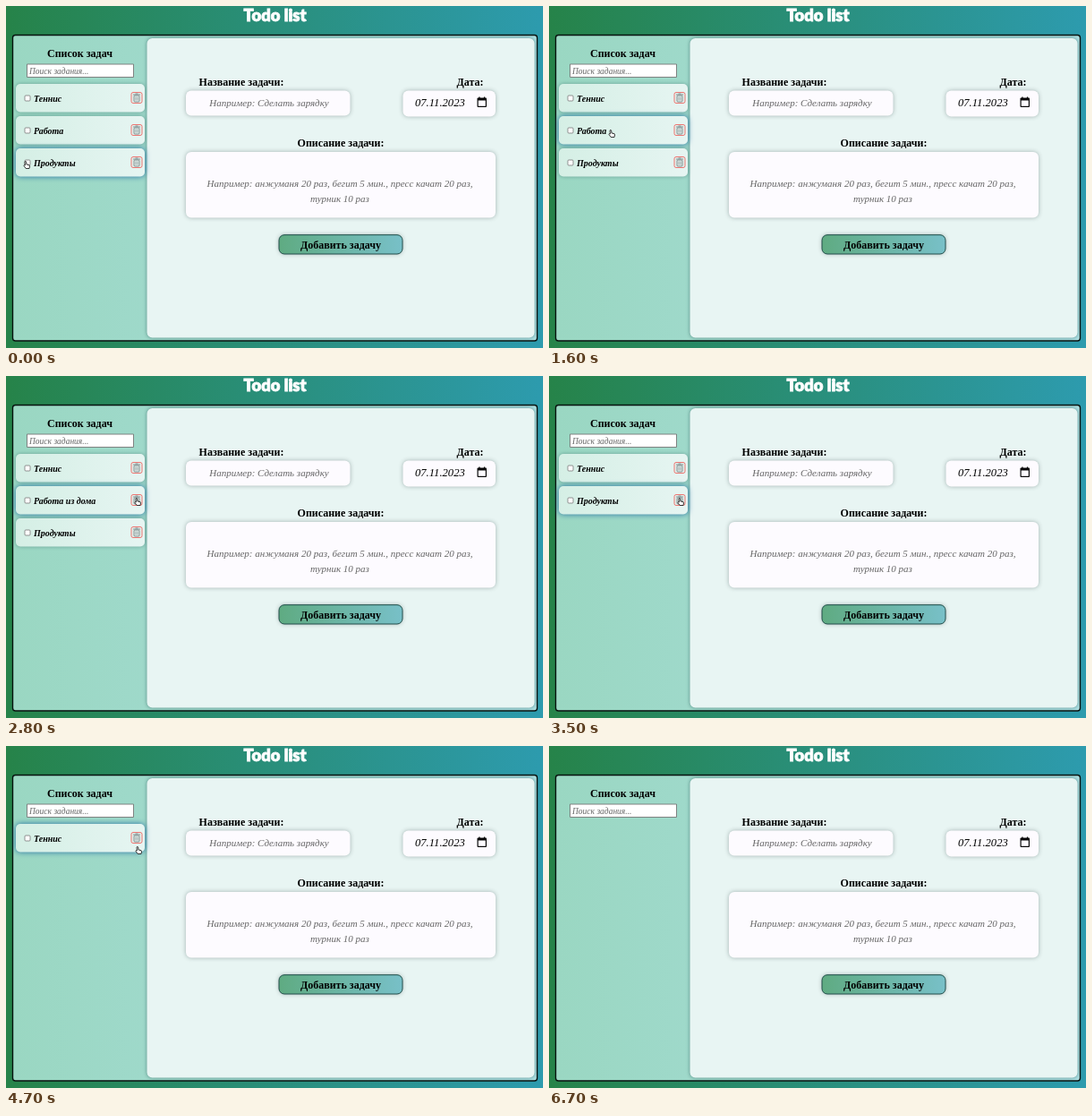
These frames come from a looping animation (600x382 px, 6800 ms). An HTML page with a canvas:

```html
<!DOCTYPE html>
<html lang="ru">
<head>
<meta charset="utf-8">
<title>Todo list</title>
<style>
html, body { margin: 0; width: 100%; height: 100%; overflow: hidden; background: #268349; }
canvas { display: block; width: 600px; height: 382px; }
</style>
</head>
<body>
<canvas id="stage" width="600" height="382"></canvas>
<script>
const ctx = document.getElementById('stage').getContext('2d');
const LOOP = 6800;
const SERIF = '"Liberation Serif", serif';
const HEAD = 'bold 12px ' + SERIF;
const HAND = 'italic 11px ' + SERIF;
const NAME = 'italic bold 10px ' + SERIF;

// Pointer tip: time, x, y
const PATH = [
  [0, 21, 173], [1250, 21, 173], [1500, 68, 138], [2050, 68, 138],
  [2300, 153, 133], [2700, 145, 136], [4300, 145, 136], [4700, 146, 112],
  [4900, 146, 103], [5300, 146, 103], [5550, 148, 104],
  [5650, 148, 104], [5900, -12, 104], [6800, -12, 104]
];

const TASKS = [
  { name: () => 'Теннис', until: 5150 },
  { name: t => 'Работа' + ' из дома'.slice(0, Math.max(0, Math.floor((t - 1550) / 70))), until: 2950 },
  { name: () => 'Продукты', until: 4100, done: t => t >= 600 && t < 1200 }
];

function pointerAt(t) {
  const i = Math.max(1, PATH.findIndex(p => p[0] > t));
  const [t0, x0, y0] = PATH[i - 1], [t1, x1, y1] = PATH[i];
  const u = (t - t0) / (t1 - t0), e = u * u * (3 - 2 * u);
  return [x0 + (x1 - x0) * e, y0 + (y1 - y0) * e];
}

function gradient(x0, x1, from, to) {
  const g = ctx.createLinearGradient(x0, 0, x1, 0);
  g.addColorStop(0, from);
  g.addColorStop(1, to);
  return g;
}

function box(x, y, w, h, r, fill, stroke, line = 1) {
  ctx.beginPath();
  ctx.roundRect(x, y, w, h, r);
  if (fill) { ctx.fillStyle = fill; ctx.fill(); }
  if (stroke) { ctx.strokeStyle = stroke; ctx.lineWidth = line; ctx.stroke(); }
}

function raised(x, y, w, h, r, fill, shadow = 'rgba(40,60,60,.38)', blur = 5) {
  ctx.save();
  ctx.shadowColor = shadow;
  ctx.shadowBlur = blur;
  box(x, y, w, h, r, fill);
  ctx.restore();
}

function text(s, x, y, font, color = '#000', align = 'center') {
  ctx.font = font;
  ctx.fillStyle = color;
  ctx.textAlign = align;
  ctx.fillText(s, x, y);
}

function lines(color, width, ...segments) {
  ctx.strokeStyle = color;
  ctx.lineWidth = width;
  ctx.beginPath();
  for (const [x0, y0, x1, y1] of segments) {
    ctx.moveTo(x0, y0);
    ctx.lineTo(x1, y1);
  }
  ctx.stroke();
}

function shape(path, x, y, fill, stroke) {
  const p = new Path2D(path);
  ctx.save();
  ctx.translate(x, y);
  ctx.lineJoin = 'round';
  ctx.lineWidth = 0.9;
  ctx.fillStyle = fill;
  ctx.strokeStyle = stroke;
  ctx.fill(p);
  ctx.stroke(p);
  ctx.restore();
}

function calendar(x, y) {
  box(x, y + 1, 10.5, 10.5, 1, '#080808');
  ctx.fillRect(x + 1.8, y, 1.3, 2);
  ctx.fillRect(x + 7.4, y, 1.3, 2);
  ctx.fillStyle = '#fdfbff';
  ctx.fillRect(x + 1.2, y + 4, 8.1, 6.3);
}

function trash(y, done) {
  box(140, y - 6, 12, 12, 2, done ? '#46a357' : '#e3eeea', done ? '#a9473f' : '#ee6a66', 0.9);
  const c = done ? '#173f22' : '#74868a';
  lines(c, 0.9, [142, y - 3.5, 150, y - 3.5], [144.5, y - 4.5, 147.5, y - 4.5]);
  box(143, y - 2.5, 6, 7, 1, null, c, 0.9);
  lines(c, 0.7, [145, y - 1, 145, y + 3], [147, y - 1, 147, y + 3]);
}

function row(task, y, t, hover) {
  const done = !!task.done && task.done(t);
  const name = task.name(t), mid = y + 16;
  raised(11, y, 144, 31.5, 5,
    done ? '#2f9e48' : gradient(11, 155, '#d5efe5', '#e6f5f2'),
    hover ? 'rgba(25,100,160,.9)' : 'rgba(40,90,90,.45)', hover ? 6 : 4);
  box(21, mid - 3, 6, 6, 1, done ? '#2374d8' : '#fff', done ? '#2374d8' : '#777', 0.8);
  if (done) lines('#fff', 1, [22, mid, 23.5, mid + 1.8], [23.5, mid + 1.8, 26.3, mid - 2]);
  text(name, 31, mid + 3.5, NAME, '#000', 'left');
  if (done) lines('#000', 1, [31, mid + 0.5, 31 + ctx.measureText(name).width, mid + 0.5]);
  trash(mid - 0.5, done);
}

function title() {
  text('Todo list', 300.5, 17, '900 18.4px Lato, sans-serif', '#fff');
  ctx.strokeStyle = '#fff';
  ctx.lineWidth = 0.8;
  ctx.strokeText('Todo list', 300.5, 17);
}

function page() {
  ctx.fillStyle = gradient(0, 600, '#268349', '#2d9bae');
  ctx.fillRect(0, 0, 600, 382);
  title();

  box(7.5, 32.5, 586, 341.5, 3, gradient(8, 594, '#9ad7c2', '#acdfe2'), '#07110e', 1.4);
  raised(157.5, 36, 433, 334.5, 6, '#e8f5f3', 'rgba(20,70,70,.55)', 4);

  text('Список задач', 82.5, 56.5, HEAD);
  box(23.5, 65, 119, 14.5, 0, '#fff', '#777', 0.9);
  text('Поиск задания...', 26, 75.5, 'italic 9.5px ' + SERIF, '#666', 'left');

  const paper = '#fdfbff';
  text('Название задачи:', 263, 89, HEAD);
  text('Дата:', 518.5, 89, HEAD);
  text('Описание задачи:', 374, 157, HEAD);
  raised(201, 94.5, 183.5, 28, 6, paper);
  raised(443.5, 94.5, 103.5, 29, 6, paper);
  raised(201, 163, 346, 73.5, 6, paper);
  text('Например: Сделать зарядку', 294, 112, HAND, '#666');
  text('07.11.2023', 457, 112, 'italic 12.6px ' + SERIF, '#000', 'left');
  calendar(526.5, 101.5);
  text('Например: анжуманя 20 раз, бегит 5 мин., пресс качат 20 раз,', 373, 202, HAND, '#666');
  text('турник 10 раз', 373, 219, HAND, '#666');

  raised(305, 255.5, 138, 21.5, 6, '#69b39b');
  box(305, 255.7, 138, 21.3, 6, gradient(305, 443, '#5fab82', '#78c0c8'), '#244f4c', 1);
  text('Добавить задачу', 374, 270.5, HEAD);
}

function draw(t) {
  page();
  const [px, py] = pointerAt(t);
  let over = false;
  TASKS.filter(task => t < task.until).forEach((task, i) => {
    const y = 87 + i * 36;
    const hover = px >= 11 && px <= 155 && py >= y && py <= y + 32;
    over = over || hover;
    row(task, y, t, hover);
  });
  if (over) {
    shape('M0 1Q.8 -.6 1.6 1L2 4L5 4.6Q6 5.5 5 8.5H1.2L-1 5.5Q-1 4 .4 5Z', px, py, '#fff', '#222');
  } else {
    shape('M0 0V6.8L1.5 5.5L2.6 8L3.8 7.4L2.8 5H4.6Z', px, py, '#000', 'rgba(255,255,255,.6)');
  }
}

function tick(now) {
  draw(now % LOOP);
  requestAnimationFrame(tick);
}
draw(0);
requestAnimationFrame(tick);
</script>
</body>
</html>
```
